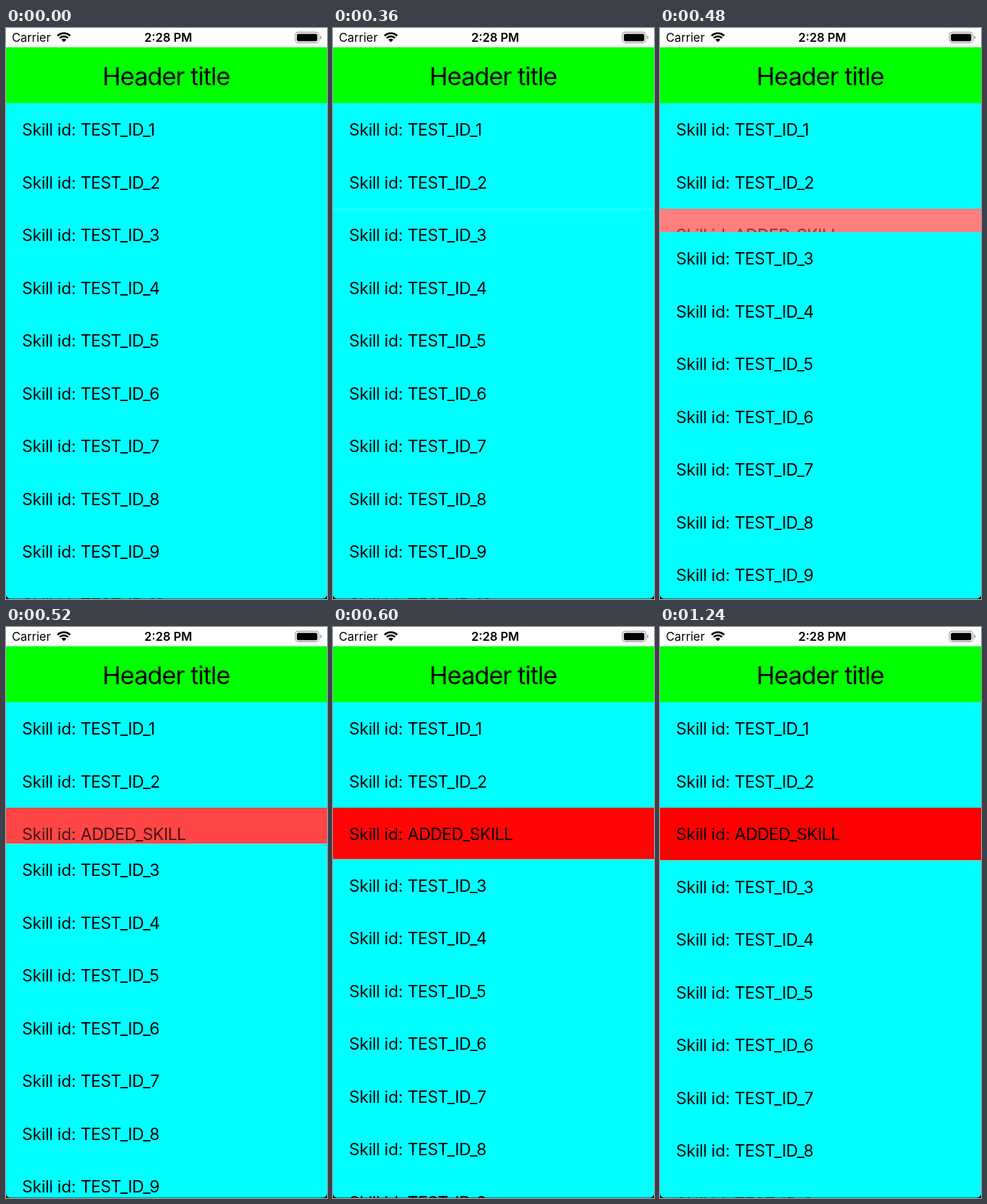
An HTML page with a canvas for the animation above (1280 ms loop, 466 by 828 pixels).

```html
<!DOCTYPE html>
<html lang="en">
<head>
<meta charset="utf-8">
<title>List insertion</title>
<style>
  html, body { margin: 0; width: 100%; height: 100%; overflow: hidden; background: #fff; }
  canvas { display: block; }
</style>
</head>
<body>
<canvas id="stage" width="466" height="828"></canvas>
<script>
const W = 466, H = 828;
const LOOP = 1280, STEP = 40;
const INSERT_START = 348, INSERT_TIME = 282;
const LIST_TOP = 109, ROW_H = 76.5, INSERT_AT = 2, ROWS = 10;
const FONT = 'Inter, "Liberation Sans", sans-serif';
const ctx = document.getElementById('stage').getContext('2d');

function rect(color, x, y, w, h) {
  ctx.fillStyle = color;
  ctx.fillRect(x, y, w, h);
}

function roundRect(x, y, w, h, r) {
  ctx.beginPath();
  ctx.roundRect(x, y, w, h, r);
}

function text(str, x, y, size, { weight = 400, align = 'left', spacing = 0 } = {}) {
  ctx.font = `${weight} ${size}px ${FONT}`;
  ctx.letterSpacing = `${spacing * size}px`;
  ctx.textAlign = align;
  ctx.fillStyle = '#000';
  ctx.fillText(str, x, y);
}

// Equivalent to cubic-bezier(.42, 0, .58, 1)
function easeInOut(x) {
  if (x <= 0) return 0;
  if (x >= 1) return 1;
  let lo = 0, hi = 1;
  for (let i = 0; i < 24; i++) {
    const s = (lo + hi) / 2, r = 1 - s;
    const bx = 1.26 * s * r * r + 1.74 * s * s * r + s ** 3;
    if (bx < x) lo = s; else hi = s;
  }
  return lo * lo * (3 - 2 * lo);
}

function rowLabel(id, top) {
  text('Skill id:', 23.3, top + 47, 24, { spacing: -0.01 });
  text(id, 108.3, top + 47, 24, { spacing: -0.02 });
}

function drawWifi(x, y) {
  ctx.save();
  ctx.beginPath();
  ctx.moveTo(x, y);
  ctx.arc(x, y, 16, -Math.PI * 0.75, -Math.PI * 0.25);
  ctx.closePath();
  ctx.clip();
  ctx.strokeStyle = ctx.fillStyle = '#000';
  ctx.lineWidth = 2.7;
  for (const r of [8.4, 12.9]) {
    ctx.beginPath();
    ctx.arc(x, y, r, 0, Math.PI * 2);
    ctx.stroke();
  }
  ctx.beginPath();
  ctx.arc(x, y, 5, 0, Math.PI * 2);
  ctx.fill();
  ctx.restore();
}

function drawBattery() {
  ctx.strokeStyle = '#999';
  ctx.lineWidth = 1.2;
  roundRect(420, 6.2, 34.2, 15.2, 4.2);
  ctx.stroke();
  ctx.fillStyle = '#000';
  roundRect(422.2, 8.4, 29.8, 10.8, 2.2);
  ctx.fill();
  ctx.fillStyle = '#999';
  roundRect(456, 11.2, 1.8, 5.2, [0, 2, 2, 0]);
  ctx.fill();
}

function drawStatusBar() {
  rect('#fff', 0, 0, W, 28);
  text('Carrier', 8.4, 20, 17.3);
  drawWifi(84, 20.5);
  text('2:28 PM', 235.5, 20, 17.3, { weight: 600, align: 'center' });
  drawBattery();
}

function drawHeader() {
  rect('#0f0', 0, 28, W, LIST_TOP - 28);
  text('Header title', 232.5, 82.5, 36, { align: 'center', spacing: -0.028 });
}

function drawInsertedRow(top, height, progress) {
  rect('#fff', 0, top, W, height);
  ctx.save();
  ctx.beginPath();
  ctx.rect(0, top, W, height);
  ctx.clip();
  ctx.globalAlpha = progress ** 0.85;
  rect('#f00', 0, top, W, height);
  rowLabel('ADDED_SKILL', top);
  ctx.restore();
}

function drawList(progress) {
  const gap = ROW_H * progress;
  rect('#0ff', 0, LIST_TOP, W, H - LIST_TOP);
  if (gap > 0) drawInsertedRow(LIST_TOP + INSERT_AT * ROW_H, gap, progress);
  for (let i = 0; i < ROWS; i++) {
    const shift = i < INSERT_AT ? 0 : gap;
    rowLabel(`TEST_ID_${i + 1}`, LIST_TOP + i * ROW_H + shift);
  }
}

function drawScreenCorners() {
  ctx.fillStyle = '#000';
  ctx.beginPath();
  ctx.rect(0, 800, W, 28);
  ctx.roundRect(0, 790, W, 37.6, [0, 0, 6, 6]);
  ctx.rect(0, 790, W, 10);
  ctx.fill('evenodd');
}

function frame(now) {
  const time = Math.floor((now % LOOP) / STEP) * STEP;
  drawList(easeInOut((time - INSERT_START) / INSERT_TIME));
  drawScreenCorners();
  drawHeader();
  drawStatusBar();
}

const start = performance.now();
function tick() {
  frame(performance.now() - start);
  requestAnimationFrame(tick);
}
tick();
</script>
</body>
</html>
```
